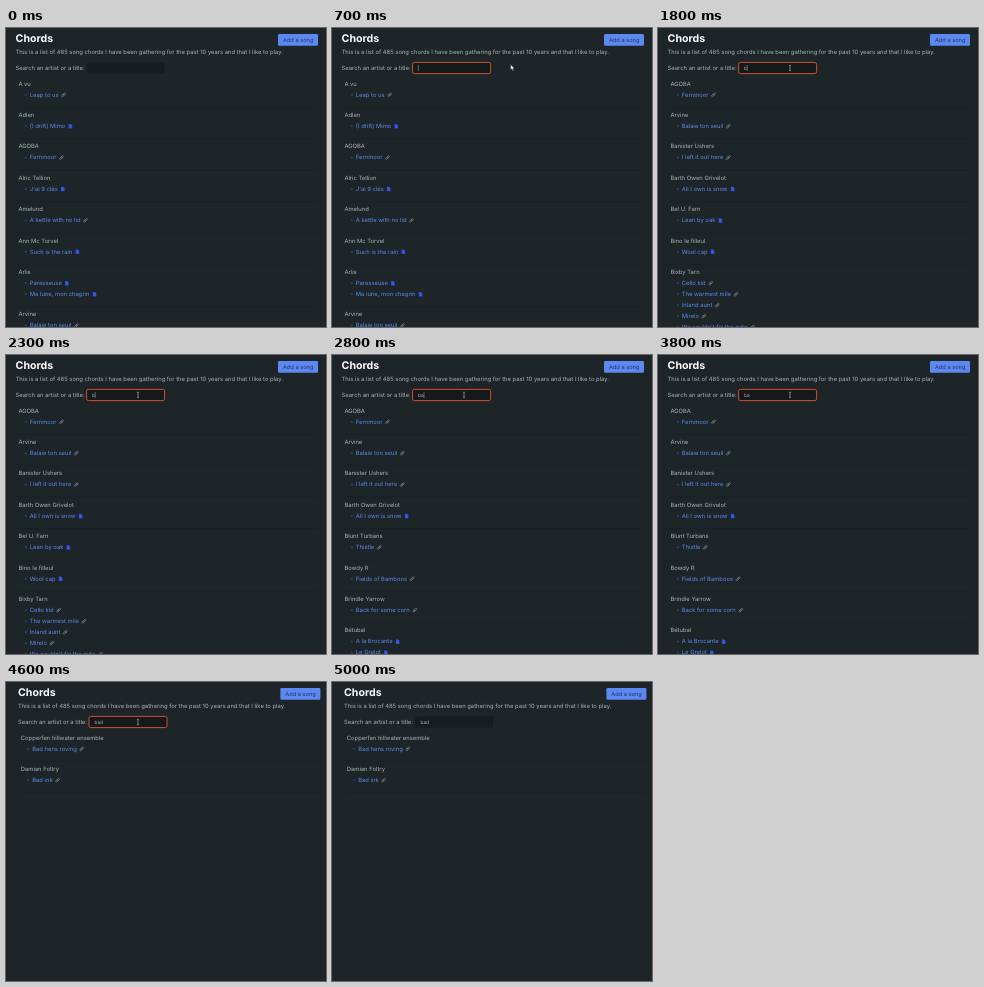
Recreate the animation shown at these times as an HTML page. Size 320 by 299 pixels, loop 7.5 s.

```html
<!DOCTYPE html>
<html lang="en">
<head>
<meta charset="utf-8">
<title>Chords</title>
<style>
  html, body { margin: 0; width: 100%; height: 100%; overflow: hidden; background: #1d2529; }
  svg { display: block; width: 320px; height: 299px; }
  text {
    font: 5.85px Inter, "Open Sans", sans-serif;
    fill: #adb3b6;
    text-rendering: geometricPrecision;
    white-space: pre;
  }
  .title { font-size: 10.6px; font-weight: 700; fill: #fff; }
  .action { font-size: 5.7px; fill: #25345f; }
  .link { fill: #5c8bea; }
  #query { font-size: 4.8px; }
  .bullet { fill: none; stroke: #3d5a8d; stroke-width: .5; }
  .rule { stroke: #181f23; stroke-width: .5; }
</style>
</head>
<body>
<svg viewBox="0 0 320 299">
  <defs>
    <g id="chain" fill="none" stroke="#7d8488" stroke-width=".7">
      <g transform="rotate(-42)">
        <rect x="-2.4" y="-.8" width="2.8" height="1.6" rx=".8"/>
        <rect x="-.4" y="-.8" width="2.8" height="1.6" rx=".8"/>
      </g>
    </g>
    <g id="sheet">
      <path d="M-1.8-2.2H.5L1.8-.9V2.3H-1.8Z" fill="#2b52dc"/>
      <path d="M-.9-.4H.7M-.9 .9H.9" stroke="#5578e8" stroke-width=".4"/>
    </g>
  </defs>
  <g id="page">
    <text class="title" x="9.6" y="14.2">Chords</text>
    <rect x="272" y="6" width="40" height="11.8" rx="1.2" fill="#5c88f2"/>
    <text class="action" x="276.9" y="14">Add a song</text>
    <text x="9.6" y="26.3">This is a list of 485 song chords I have been gathering for the past 10 years and that I like to play.</text>
    <text x="9.6" y="41.6">Search an artist or a title:</text>
    <rect id="field" x="80.6" y="34.4" width="78" height="11.2" rx="1.8"/>
    <text id="query" x="86" y="41.6"></text>
    <path id="caret" stroke="#aab0b3" stroke-width=".5"/>
    <g id="list"></g>
  </g>
  <path id="arrow" d="M0 0V5.4L1.3 4.2 2.2 6.2 3.1 5.8 2.2 3.9H3.9Z" fill="#fff" stroke="#111" stroke-width=".4"/>
  <path id="beam" d="M-.8-2.7H.8M0-2.7V2.7M-.8 2.7H.8" fill="none" stroke="#e8e8e8" stroke-width=".5"/>
</svg>
<script>
const $ = id => document.getElementById(id);
const LOOP = 7500, STEP = 100;

// Artist, then titles; a leading * marks a sheet instead of a link.
const songs = [
  ["A vu", "Leap to us"],
  ["Adlen", "*(I drift) Mimo"],
  ["AGOBA", "Fernmoor"],
  ["Alric Tellion", "*J'ai 9 clés"],
  ["Amelund", "A kettle with no lid"],
  ["Ann Mc Torvel", "*Such is the rain"],
  ["Arlis", "*Paresseuse", "*Ma lune, mon chagrin"],
  ["Arvine", "Balaie ton seuil"],
  ["Banister Ushers", "I left it out here"],
  ["Barth Owen Grivelot", "*All I own is snow"],
  ["Bel U. Farn", "*Lean by oak"],
  ["Bino le filleul", "*Wool cap"],
  ["Bixby Tarn", "Cello kid", "The warmest mile", "Inland aunt", "Mirelo", "We couldn't fix the gate"],
  ["Blunt Turbans", "Thistle"],
  ["Bowdy R", "Fields of Bamboos"],
  ["Brindle Yarrow", "Back for some corn"],
  ["Bétubal", "*A la Brocante", "*Le Grelot"],
  ["Copperfen hillwater ensemble", "Bad hens roving"],
  ["Damian Foltry", "Bad ink"]
];

// Pointer path: time, x, y
const path = [
  [100, 205, 250], [400, 140, 40], [500, 140, 40], [700, 178.6, 36.6],
  [800, 178.6, 36.6], [1000, 132, 40], [4700, 132, 40], [4900, 136, 50]
];
const typed = [[3900, "bad"], [2800, "ba"], [1800, "b"], [0, ""]];
const caretOn = [[400, 900], [1800, 3800], [3900, 4100]];

const within = (t, [a, b]) => t >= a && t < b;

function add(tag, attrs, content = "") {
  const el = document.createElementNS("http://www.w3.org/2000/svg", tag);
  for (const key in attrs) el.setAttribute(key, attrs[key]);
  el.textContent = content;
  return $("list").appendChild(el);
}

function showList(query) {
  $("list").replaceChildren();
  let y = 57.6;
  for (const [artist, ...titles] of songs) {
    const hits = titles.filter(s => `${artist} ${s}`.toLowerCase().includes(query));
    if (!hits.length) continue;
    if (y > 310) break;
    add("text", { x: 12.4, y }, artist);
    for (const hit of hits) {
      y += 11;
      add("circle", { class: "bullet", cx: 19.8, cy: y - 1.8, r: .8 });
      const link = add("text", { class: "link", x: 23.8, y }, hit.replace("*", ""));
      const x = 23.8 + link.getComputedTextLength() + 5;
      add("use", { href: hit[0] === "*" ? "#sheet" : "#chain", x, y: y - 1.8 });
    }
    add("path", { class: "rule", d: `M12.5 ${y + 10.8}H312` });
    y += 20.4;
  }
}

function pointerAt(t) {
  const i = path.findIndex(p => p[0] > t);
  if (i < 1) return null;
  const [t0, x0, y0] = path[i - 1], [t1, x1, y1] = path[i];
  const k = (t - t0) / (t1 - t0);
  return [x0 + (x1 - x0) * k, y0 + (y1 - y0) * k];
}

function place(id, pos, visible) {
  $(id).style.display = visible ? "" : "none";
  if (visible) $(id).setAttribute("transform", `translate(${pos})`);
}

let shown = null;

function draw(now) {
  const t = Math.floor(now % LOOP / STEP) * STEP;
  const query = typed.find(([from]) => t >= from)[1];
  if (query !== shown) {
    shown = query;
    $("query").textContent = query;
    showList(query);
    // The short page has no scrollbar, so its content moves right.
    $("page").setAttribute("transform", `translate(${query === "bad" ? 2.4 : 0})`);
  }

  const focus = within(t, [400, 4900]);
  $("field").setAttribute("fill", focus ? "#14191c" : "#161c1f");
  $("field").setAttribute("stroke", focus ? "#cf4f2b" : "none");

  const x = 86.3 + (query ? $("query").getComputedTextLength() : 0);
  $("caret").setAttribute("d", `M${x} 37V43.2`);
  $("caret").style.display = caretOn.some(span => within(t, span)) ? "" : "none";

  const pos = pointerAt(t);
  const overField = pos && within(pos[0], [80, 159]) && within(pos[1], [34, 46]);
  place("beam", pos, overField);
  place("arrow", pos, pos && !overField);
  requestAnimationFrame(draw);
}
draw(performance.now());
</script>
</body>
</html>
```
